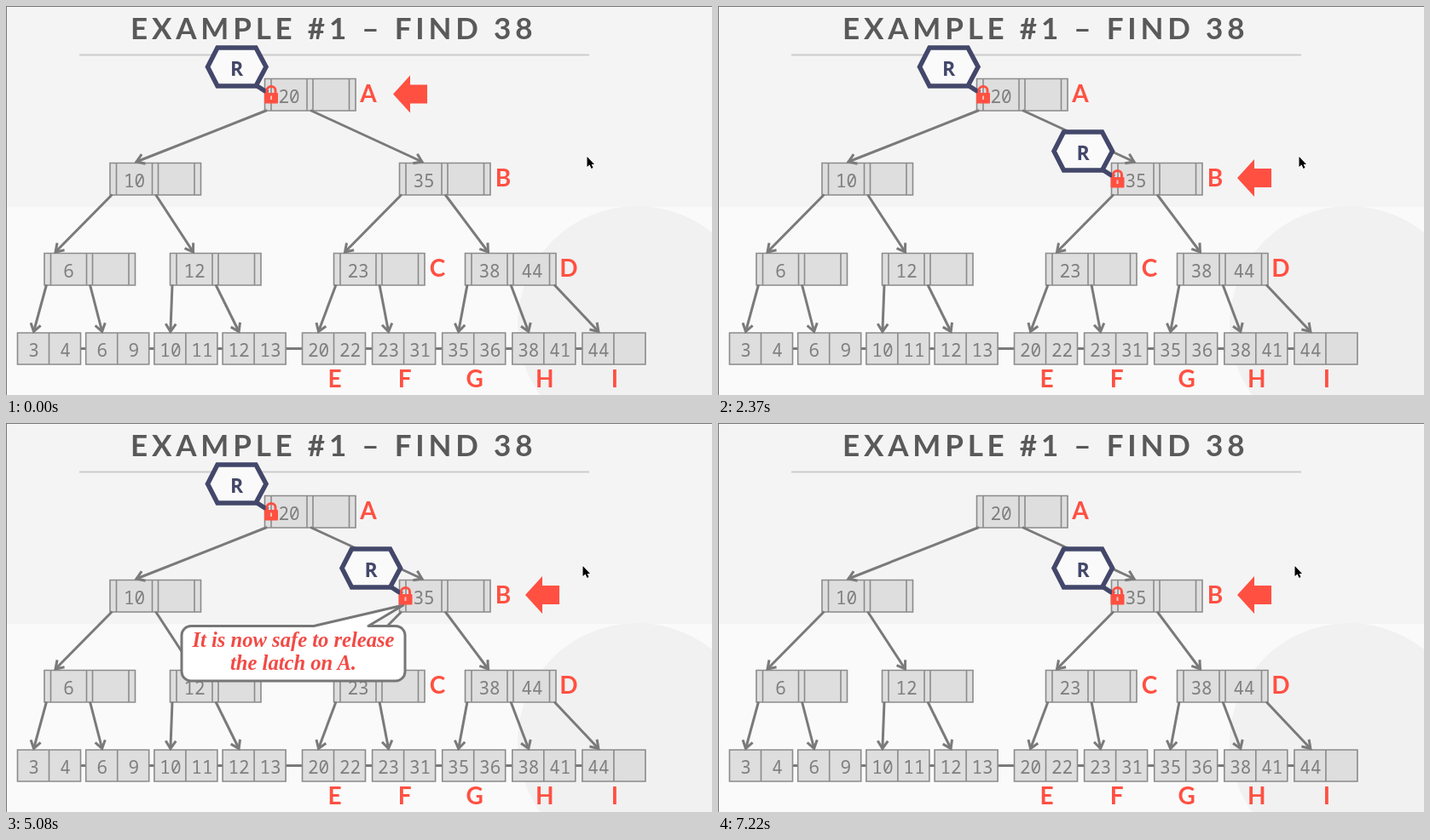
These frames come from a looping animation (828x457 px, 8000 ms). An HTML page:

```html
<!DOCTYPE html>
<html lang="en">
<head>
<meta charset="utf-8">
<title>Tree search with latches</title>
<style>
  html, body { margin: 0; height: 100%; overflow: hidden; }
  svg { display: block; width: 828px; height: 457px; background: #f4f4f4; }
  text { text-anchor: middle; }
  .title { font: bold 35px Lato, sans-serif; letter-spacing: 4.8px; fill: #595959; text-anchor: start; }
  .key { font: 21px "Noto Sans Mono", monospace; fill: #7f7f7f; }
  .label { font: bold 28px Lato, sans-serif; fill: #ff5042; }
  .mode { font: bold 23px "Noto Sans", sans-serif; fill: #43476a; }
  .note { font: italic bold 24.6px "Liberation Serif", serif; fill: #f24a45; }
  .box { fill: #dedede; stroke: #8b8b8b; stroke-width: 1.6; }
  .edge { fill: none; stroke: #7a7a7a; stroke-width: 3; }
  .red { fill: #ff5042; }
  .hex { fill: #fafafa; stroke: #43476a; stroke-width: 5.5; }
</style>
</head>
<body>
<svg viewBox="0 0 828 457">
  <defs>
    <marker id="tip" markerUnits="userSpaceOnUse" markerWidth="16" markerHeight="18" refX="12" refY="9" orient="auto">
      <path class="edge" d="M3 3L12 9L3 15"/>
    </marker>
    <g id="latch">
      <path class="hex" d="M293 93L307 102"/>
      <path class="hex" d="M236.5 71.5L248 49H293L305 71.5L293 94H248Z"/>
      <text class="mode" x="270.5" y="82">R</text>
      <path d="M306 104V99a5 4.5 0 0 1 10 0V104" fill="none" stroke="#ff5042" stroke-width="3"/>
      <rect class="red" x="303" y="102" width="16" height="12.5" rx="1"/>
      <path d="M311 105.5V110" stroke="#ffc0b8" stroke-width="2"/>
    </g>
  </defs>
  <rect y="236" width="828" height="221" fill="#fafafa"/>
  <circle cx="740" cy="375" r="140" fill="#f1f1f1"/>
  <path d="M0 .5H828M.5 0V457" stroke="#777"/>
  <path d="M86 57.5H684" stroke="#cdcdcd" stroke-width="2"/>
  <text class="title" x="146" y="39">EXAMPLE #1 – FIND 38</text>
  <g id="tree"></g>
  <g id="bubble">
    <path d="M217 238.5H361L466 214L425 238.5H457a11 11 0 0 1 11 11V292a11 11 0 0 1-11 11H217a11 11 0 0 1-11-11V249.5a11 11 0 0 1 11-11Z"
      fill="#fff" stroke="#777" stroke-width="3" stroke-linejoin="round"/>
    <text class="note" x="337" y="263">It is now safe to release</text>
    <text class="note" x="337" y="290">the latch on A.</text>
  </g>
  <use id="latchA" href="#latch"/>
  <use id="latchB" href="#latch" x="157.5" y="99"/>
  <path id="pointer" class="red" d="M454 103.5L474 81.5V92.5H494V114.5H474V125.5Z"/>
  <path id="cursor" d="M0 0V12L3 9.5L5 14L7 13L5.2 9H8.5Z" stroke="#fff" stroke-width="1.4" paint-order="stroke"/>
</svg>
<script>
const $ = id => document.getElementById(id);
const text = (cls, x, y, value) => `<text class="${cls}" x="${x}" y="${y}">${value}</text>`;
const box = d => `<path class="box" d="${d}"/>`;
const bar = (x, y, h) => `M${x} ${y}v${h}`;
const keyText = (x, y, step, keys) => keys.map((k, i) => text('key', x + step * i, y, k)).join('');
const edge = (x1, y1, x2, y2) =>
  `<path class="edge" marker-end="url(#tip)" d="M${x1} ${y1}L${x2} ${y2}"/>`;

// Leaves sit in two evenly spaced runs, one under each half of the tree
let leafCount = 0;
function leaf(name, ...keys) {
  const i = leafCount++;
  const x = i < 4 ? 13.5 + 80.2 * i : 347.5 + 82.1 * (i - 4);
  return { x, name, keys, kids: [] };
}
const node = (x, name, keys, ...kids) => ({ x, name, keys, kids });

const root = node(303.5, 'A', [20],
  node(122, '', [10],
    node(45, '', [6], leaf('', 3, 4), leaf('', 6, 9)),
    node(192.5, '', [12], leaf('', 10, 11), leaf('', 12, 13))),
  node(461.5, 'B', [35],
    node(384.5, 'C', [23], leaf('E', 20, 22), leaf('F', 23, 31)),
    node(538.5, 'D', [38, 44], leaf('G', 35, 36), leaf('H', 38, 41), leaf('I', 44))));

const rowTops = [85.5, 184.5, 290.5, 384];
const arrivals = [i => 31 - 4.5 * i, i => 13 + 14 * i, () => 19];

function render({ x, name, keys, kids }, depth) {
  const y = rowTops[depth];
  if (!kids.length) {
    return box(`M${x} ${y}h74v37h-74z` + bar(x + 37, y, 37)) +
      keyText(x + 19, y + 28, 37, keys) + text('label', x + 38, y + 64, name);
  }
  const bars = [7.5, 49.5, 56.5, 99].map(d => bar(x + d, y, 37.5)).join('');
  return box(`M${x} ${y}h106.5v37.5h-106.5z` + bars) +
    keyText(x + 28.5, y + 28, 50, keys) + text('label', x + 121.5, y + 27, name) +
    kids.map((kid, i) => render(kid, depth + 1) +
      edge(x + 2.5 + 51 * i, y + 37, kid.x + arrivals[depth](i), rowTops[depth + 1] - 1.5)).join('');
}
$('tree').innerHTML = '<path class="edge" d="M80 402.5H690"/>' + render(root, 0);

const show = (id, on) => $(id).setAttribute('visibility', on ? 'visible' : 'hidden');
const move = (id, x, y) => $(id).setAttribute('transform', `translate(${x} ${y})`);

function draw() {
  const t = performance.now() % 8000;
  show('latchA', t < 6550);
  show('latchB', t >= 1650);
  show('bubble', t >= 5080 && t < 6550);
  move('pointer', ...(t < 1650 ? [0, 0] : [155, 98.5]));
  move('cursor', ...(t < 4390 ? [681.5, 177] : [676.5, 168]));
  requestAnimationFrame(draw);
}
draw();
</script>
</body>
</html>
```
